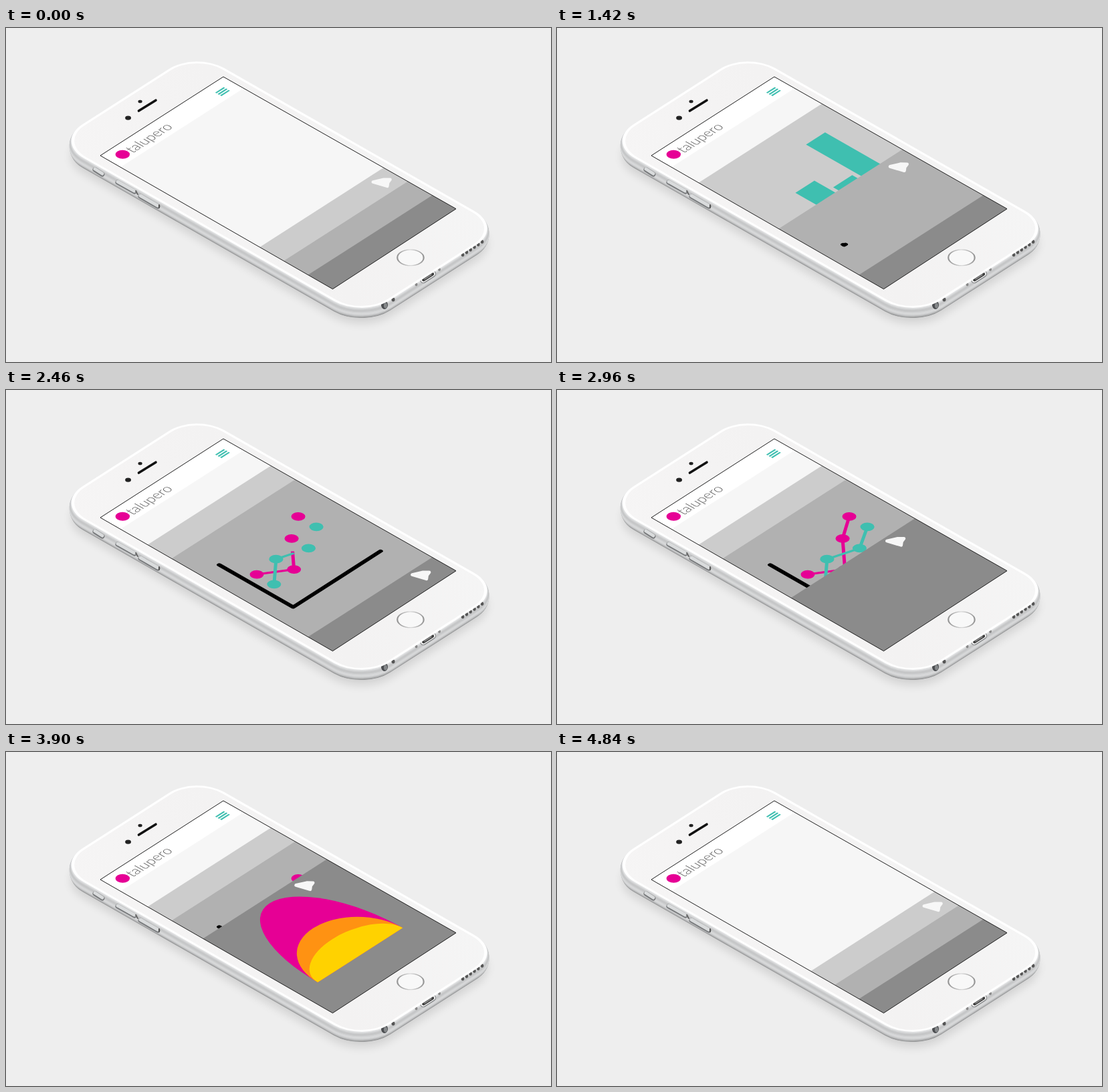
These frames come from a looping animation (815 px wide and 500 px high, 5420 ms). An HTML page:

```html
<!DOCTYPE html>
<html lang="en">
<head>
<meta charset="utf-8">
<title>Phone panels</title>
<style>
  html, body { margin: 0; width: 100%; height: 100%; overflow: hidden; background: #eee; }
  svg { display: block; width: 815px; height: 500px; }
  .logo { font: 300 35px Lato, "Open Sans", sans-serif; fill: #5c5c5c; }
</style>
</head>
<body>
<svg viewBox="0 0 815 500">
  <defs>
    <linearGradient id="face" x1="0" y1="0" x2="1" y2="1">
      <stop offset="0" stop-color="#f6f5f5"/>
      <stop offset=".5" stop-color="#f3f2f2"/>
      <stop offset="1" stop-color="#f5f5f5"/>
    </linearGradient>
    <linearGradient id="ring" x1="0" y1="0" x2="1" y2="1">
      <stop offset="0" stop-color="#777"/>
      <stop offset=".5" stop-color="#d8d8d8"/>
      <stop offset="1" stop-color="#777"/>
    </linearGradient>
    <filter id="blur" x="-10%" y="-10%" width="120%" height="125%">
      <feGaussianBlur stdDeviation="7"/>
    </filter>
    <rect id="body" x="-30" y="-101" width="428" height="882" rx="82"/>
    <rect id="panel" x="-4" width="383" height="675"/>
    <path id="glass" d="M141 191L325 73L673 270.7L488.5 390.8Z"/>
    <clipPath id="screen"><use href="#glass"/></clipPath>
    <clipPath id="clip1"><use href="#panel"/></clipPath>
    <clipPath id="clip2"><use href="#panel"/></clipPath>
    <clipPath id="clip3"><use href="#panel"/></clipPath>
  </defs>

  <rect width="815" height="500" fill="#eee"/>
  <g id="shadow" filter="url(#blur)" opacity=".12"></g>
  <g id="sides"></g>
  <g id="ports"></g>

  <g class="plane">
    <use href="#body" fill="#fff"/>
    <rect x="-24" y="-95" width="416" height="870" rx="76" fill="url(#face)"/>
    <circle cx="189" cy="711.5" r="27.5" fill="#f8f8f8" stroke="url(#ring)" stroke-width="3"/>
  </g>
  <g clip-path="url(#screen)">
    <g class="plane">
      <use href="#panel" fill="#f6f6f6"/>
      <path id="donut" fill="none" stroke="#3fbfb0" stroke-width="45"/>
      <rect x="-4" y="-4" width="383" height="62" fill="#fff"/>
      <circle cx="35" cy="31" r="15" fill="#e60095"/>
      <text class="logo" x="52" y="44">talupero</text>
      <path d="M323.5 27h26M323.5 34h26M323.5 41h26" stroke="#3fbfb0" stroke-width="4"/>
      <g clip-path="url(#clip1)">
        <use href="#panel" fill="#ccc"/>
        <g id="bars" fill="#3fbfb0"></g>
      </g>
      <g clip-path="url(#clip2)">
        <use href="#panel" fill="#b1b1b1"/>
        <path id="axis" fill="none" stroke="#000" stroke-width="10.5" stroke-linecap="round" stroke-linejoin="round"/>
        <g id="chart"></g>
      </g>
      <g clip-path="url(#clip3)">
        <use href="#panel" fill="#8b8b8b"/>
        <g id="domes"></g>
      </g>
    </g>
  </g>
  <use href="#glass" fill="none" stroke="#222"/>

  <path d="M198.5 124L224 108.2" stroke="#111" stroke-width="3.6" stroke-linecap="round"/>
  <ellipse cx="182.6" cy="134.6" rx="4.4" ry="3.2" fill="#222"/>
  <ellipse cx="200.6" cy="110" rx="3.1" ry="2.3" fill="#222"/>
  <path id="arrow" d="M549 230.5L565 226.8L574.4 226.9L571 231.3L570.2 236.8Z" fill="#f7f7f7" stroke="#f7f7f7" stroke-width="4.8" stroke-linejoin="round"/>
</svg>

<script>
const LOOP = 5420, STEP = 20;
const AX = [.4907, -.3147], AY = [.5217, .2983];
const TEAL = '#3fbfb0', PINK = '#e60095';
const $ = id => document.getElementById(id);

function add(parent, tag, attrs) {
  const el = document.createElementNS('http://www.w3.org/2000/svg', tag);
  for (const k in attrs) el.setAttribute(k, attrs[k]);
  return parent.appendChild(el);
}

const plane = (dy = 0) => `matrix(${[...AX, ...AY, 141, 191 + dy]})`;
const clamp = x => Math.max(0, Math.min(1, x));
const ease = x => x < .5 ? 2 * x * x : 1 - 2 * (1 - x) ** 2;
const grow = (t, start, span) => ease(clamp((t - start) / span));

// Eased value from keys [time, value]
function track(keys, t) {
  let i = 0;
  while (i < keys.length - 1 && t >= keys[i + 1][0]) i++;
  const [t0, a] = keys[i], [t1, b] = keys[Math.min(i + 1, keys.length - 1)];
  return t1 > t0 ? a + (b - a) * grow(t, t0, t1 - t0) : a;
}

// Phone shell, stacked from the bottom edge up
for (const g of document.querySelectorAll('.plane')) g.setAttribute('transform', plane());
add($('shadow'), 'use', { href: '#body', transform: plane(23), fill: '#000' });
const tones = [226, 214, 202, 196, 200, 208, 214, 216, 212, 204, 194, 182, 170, 157, 145];
const depth = tones.length;
for (let dy = depth; dy > 0; dy--) {
  const c = tones[dy - 1], tone = `rgb(${c},${c + 1},${c + 2})`;
  add($('sides'), 'use', {
    href: '#body', transform: plane(dy), fill: tone, stroke: tone,
    'stroke-width': 9 * Math.sin(Math.PI * dy / (depth + 1))
  });
}

// Buttons and openings on the edges
function slot(x1, y1, x2, y2, width, color) {
  add($('ports'), 'path', { d: `M${x1} ${y1}L${x2} ${y2}`, stroke: color, 'stroke-width': width, 'stroke-linecap': 'round' });
}
for (const [x1, y1, x2, y2] of [[133, 211, 144, 218], [167, 230, 192, 244], [201, 251, 227, 266]]) {
  slot(x1, y1 + 1, x2, y2 + 1, 7, '#77797b');
  slot(x1, y1, x2, y2, 5, '#d9dbdc');
}
slot(194, 244, 197, 249, 2, '#666');
slot(229, 265, 229, 269, 2, '#555');
slot(624, 377, 638, 368, 10, '#77797b');
slot(624, 377, 638, 368, 8, '#eee');
slot(624.5, 376.7, 637.5, 368.3, 5, '#3c3c3c');
slot(626, 376, 636, 369.5, 1.5, '#8a8a8a');
function hole(x, y, rx, ry, color) {
  add($('ports'), 'ellipse', { cx: x, cy: y, rx, ry, fill: color });
}
hole(566, 414.5, 5, 6.5, '#4b4d50');
hole(567.5, 415.5, 2.5, 4, '#85888a');
hole(579, 406.5, 2.5, 3, '#555');
hole(613.5, 384, 2, 2.4, '#888');
hole(648, 361.5, 2, 2.4, '#888');
for (let i = 0; i < 6; i++) hole(683 + i * 5.8, 339.5 - i * 3.9, 2.3, 2.8, '#555');

// Bar chart
const bars = [55, 131, 87, 229].map((h, i) => ({
  h, el: add($('bars'), 'rect', { x: 45 + i * 68.3, width: 58 })
}));

// Line chart
const cols = [82, 148, 222, 287];
const series = [
  { color: PINK, ys: [371.5, 416, 339.5, 297.5] },
  { color: TEAL, ys: [421, 364.7, 388.3, 349.4] }
].map(({ color, ys }) => {
  const line = add($('chart'), 'path', {
    d: 'M' + ys.map((y, i) => `${cols[i]} ${y}`).join('L'),
    fill: 'none', stroke: color, 'stroke-width': 7, pathLength: 1
  });
  const dots = ys.map((y, i) => add($('chart'), 'circle', { cx: cols[i], cy: y, fill: color }));
  return { line, dots };
});

// Area chart
const domes = [
  { h: 260, start: 3100, fill: PINK },
  { h: 135, start: 3225, fill: '#ff9212' },
  { h: 80, start: 3310, fill: '#ffd200' }
].map(d => ({ ...d, el: add($('domes'), 'path', { fill: d.fill }) }));

const panels = [
  [[0, 458], [480, 458], [840, 136], [4620, 136], [4840, 458]],
  [[0, 527], [1240, 527], [1600, 205], [4240, 205], [4460, 527]],
  [[0, 597], [2760, 597], [3120, 274], [3860, 274], [4080, 597]]
];

// Pointer offset along both screen axes
const path = [
  [0, 0, 0], [480, 0, 0], [840, -7, -322], [1200, -8, 73], [1240, -8, 73], [1600, -12, -249],
  [2300, -21, 132], [2760, -21, 132], [3120, -62, -191], [3860, -62, -188], [4080, -10, 146],
  [4240, -5, -250], [4460, 0, 72], [4620, 0, -322], [4840, 0, 0]
];
const moveX = path.map(([t, x]) => [t, x]), moveY = path.map(([t, , y]) => [t, y]);

function drawDonut(t) {
  const p = t < 1000 ? grow(t, 80, 380) : 0;
  const r = 107.5, cx = 179, cy = 267.5, a = Math.min(p, .9999) * 2 * Math.PI;
  $('donut').setAttribute('d', p
    ? `M${cx} ${cy - r}A${r} ${r} 0 ${+(p > .5)} 1 ${cx + r * Math.sin(a)} ${cy - r * Math.cos(a)}`
    : '');
}

function drawChart(t) {
  const p = grow(t, 1380, 480);
  $('axis').setAttribute('d', p ? `M52 ${504 - 212 * p}V504H${52 + 266 * p}` : '');
  const drawn = grow(t, 2200, 500);
  for (const { line, dots } of series) {
    line.setAttribute('stroke-dasharray', `${drawn} 2`);
    line.setAttribute('visibility', drawn ? 'visible' : 'hidden');
    dots.forEach((dot, i) => dot.setAttribute('r', 14.7 * grow(t, 1840 + i * 70, 150)));
  }
}

function draw(t) {
  panels.forEach((keys, i) => {
    $('clip' + (i + 1)).firstElementChild.setAttribute('y', track(keys, t));
  });
  drawDonut(t);
  bars.forEach(({ h, el }, i) => {
    const now = h * grow(t, 800 + i * 80, 160);
    el.setAttribute('y', 437.5 - now);
    el.setAttribute('height', now);
  });
  drawChart(t);
  for (const { h, start, el } of domes) {
    const now = h * grow(t, start, 420);
    el.setAttribute('d', now ? `M54 572.5A129.5 ${now} 0 0 1 313 572.5Z` : '');
  }
  const x = track(moveX, t), y = track(moveY, t);
  $('arrow').setAttribute('transform', `translate(${AX[0] * x + AY[0] * y} ${AX[1] * x + AY[1] * y})`);
}

function tick() {
  draw(Math.floor(performance.now() % LOOP / STEP) * STEP);
  requestAnimationFrame(tick);
}
tick();
</script>
</body>
</html>
```
